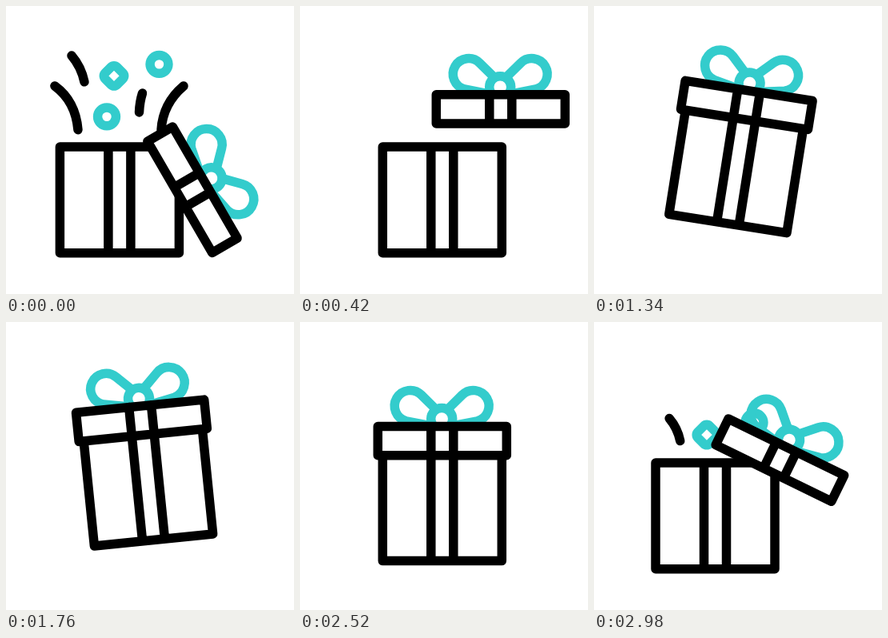
These frames come from a looping animation (360x360 px, 3 s). An HTML page with a canvas:

```html
<!DOCTYPE html>
<html>
<head>
<meta charset="utf-8">
<title>Gift box</title>
<style>
html, body { margin: 0; height: 100%; overflow: hidden; background: #fff; }
canvas { display: block; width: 360px; height: 360px; }
</style>
</head>
<body>
<canvas id="stage" width="360" height="360"></canvas>
<script>
const ctx = document.getElementById('stage').getContext('2d');
const LOOP = 3000, BLACK = '#000', TEAL = '#33cccc';

const ramp = (t, a, b) => Math.min(1, Math.max(0, (t - a) / (b - a)));
const mix = (a, b, k) => a + (b - a) * k;

// Resting place, and the offset (dx, dy) halfway through the burst.
const rings = [
  { x: 191.5, y: 73, dx: 9, dy: 53 },
  { x: 126, y: 138.5, dx: 10, dy: 65 },
  { x: 135, y: 87.5, dx: 6, dy: 54, square: true }
];
// Each curve: tip, control point, tail.
const streaks = [
  { p: [82, 62, 94, 76, 98, 95], dx: 11, dy: 56.5 },
  { p: [61, 100, 87, 119, 90, 155], dx: 20, dy: 90 },
  { p: [222, 100, 196, 122, 194, 155], dx: -20, dy: 90 },
  { p: [170.5, 109, 167, 120, 166.5, 133], dx: 0, dy: 80 }
];

const lobe = new Path2D('M8.5 -40 L25.6 -56.8 A19.5 19.5 0 1 1 44.4 -24.2 L13 -18');

function placed(x, y, angle, sx, draw) {
  ctx.save();
  ctx.translate(x, y);
  ctx.rotate(angle * Math.PI / 180);
  ctx.scale(sx, Math.abs(sx));
  draw();
  ctx.restore();
}

function crate(halfWidth, top, bottom) {
  ctx.strokeStyle = BLACK;
  ctx.fillStyle = '#fff';
  ctx.beginPath();
  ctx.rect(-halfWidth, top, halfWidth * 2, bottom - top);
  ctx.fill();
  for (const x of [-14, 14]) {
    ctx.moveTo(x, top);
    ctx.lineTo(x, bottom);
  }
  ctx.stroke();
}

function bow() {
  ctx.strokeStyle = TEAL;
  for (const side of [-1, 1]) placed(0, 0, 0, side, () => ctx.stroke(lobe));
  ctx.beginPath();
  ctx.arc(0, -27, 13.5, 0, 7);
  ctx.stroke();
}

function lid() {
  placed(-0.6, -0.8, 0, 1, bow);
  crate(80.5, -18.3, 18);
}

function ring(r, far, gone) {
  placed(r.x + r.dx * far, r.y + r.dy * far - 35 * gone, r.square ? 45 : 0, 1 - gone, () => {
    ctx.beginPath();
    if (r.square) ctx.roundRect(-10.5, -10.5, 21, 21, 5);
    else ctx.arc(0, 0, 11.5, 0, 7);
    ctx.stroke();
  });
}

function streak({ p, dx, dy }, far, gone) {
  const size = 1 - 0.15 * far, mx = (p[0] + p[4]) / 2, my = (p[1] + p[5]) / 2;
  const [x0, y0, cx, cy, x1, y1] = p.map((v, i) => i % 2
    ? my + (v - my) * size + dy * far
    : mx + (v - mx) * size + dx * far);
  // Keep only the part of the curve next to its tip.
  const u = 1 - gone, ax = mix(x0, cx, u), ay = mix(y0, cy, u);
  ctx.beginPath();
  ctx.moveTo(x0, y0);
  ctx.quadraticCurveTo(ax, ay, mix(ax, mix(cx, x1, u), u), mix(ay, mix(cy, y1, u), u));
  ctx.stroke();
}

function confetti(t) {
  const opening = t > 2853;
  const far = opening ? 2 * (1 - ramp(t, 2853, 3107)) : 0;
  const gone = opening ? 0 : ramp(t, 0, 250);
  if (gone === 1) return;
  ctx.save();
  ctx.beginPath();
  ctx.rect(0, 0, 360, 176);
  ctx.clip();
  ctx.strokeStyle = TEAL;
  rings.forEach(r => ring(r, far, gone));
  ctx.strokeStyle = BLACK;
  streaks.forEach(s => streak(s, far, gone));
  ctx.restore();
}

function draw(t) {
  const late = t > 1500;
  const shift = 36 * (late ? ramp(t, 2640, 3107) : 1 - ramp(t, 0, 410));
  const slide = late ? ramp(t, 2640, 2775) : 1 - ramp(t, 430, 570);
  const fall = late ? ramp(t, 2787, 3107) ** 1.67 : 1 - ramp(t, 0, 420);
  const lift = 36 * (ramp(t, 570, 1040) - ramp(t, 2220, 2640));
  const tilt = 9 * Math.sin(2 * Math.PI * ramp(t, 1040, 2220));

  ctx.fillStyle = '#fff';
  ctx.fillRect(0, 0, 360, 360);
  ctx.lineWidth = 11.5;
  ctx.lineCap = ctx.lineJoin = 'round';
  confetti(t);
  placed(177.8 - shift, 242 - lift, tilt, 1, () => {
    crate(74.5, -66, 66.8);
    placed(73 * slide + 18 * fall, -83 - 30 * slide + 101 * fall, 60 * fall, 1, lid);
  });
}

const start = performance.now();
function tick() {
  draw((performance.now() - start) % LOOP);
  requestAnimationFrame(tick);
}
tick();
</script>
</body>
</html>
```
